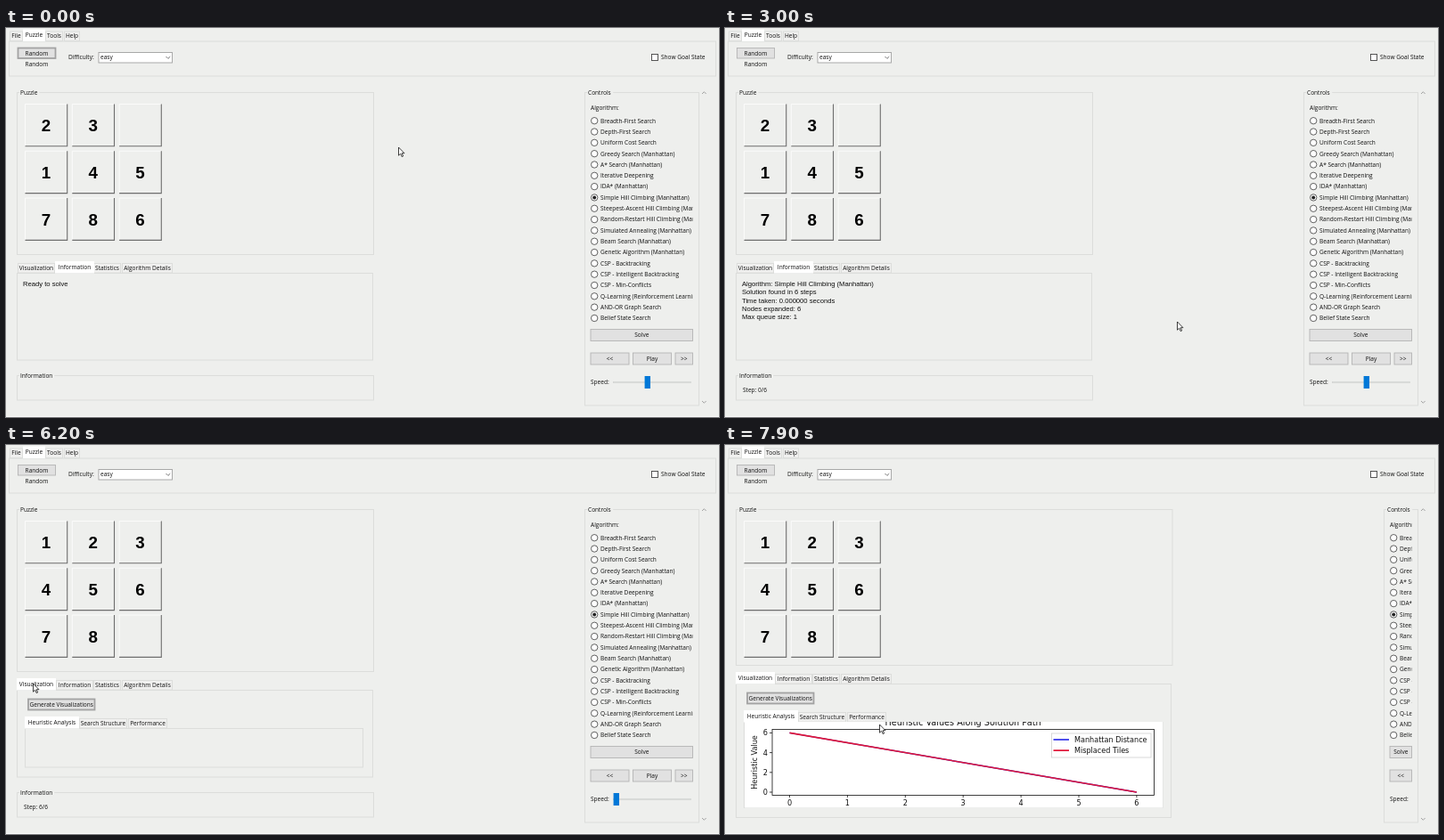
An HTML page for the animation above (8000 ms loop, 800x437 px).

```html
<!DOCTYPE html>
<html lang="en">
<head>
<meta charset="utf-8">
<title>Sliding puzzle solver</title>
<style>
  html, body { margin: 0; width: 100%; height: 100%; overflow: hidden; background: #eeefed; }
  svg { display: block; position: absolute; left: 0; top: 0; }
  text { font-family: "Open Sans", "Noto Sans", sans-serif; font-size: 6.55px; fill: #101010; white-space: pre; }
  .log { font-family: "Liberation Sans", Arial, sans-serif; font-size: 7.65px; }
  .digit { font-family: "Liberation Sans", Arial, sans-serif; font-size: 18.75px; font-weight: bold; fill: #000; }
  .plot { font-family: "DejaVu Sans", sans-serif; font-size: 8.1px; }
  .title { font-family: "DejaVu Sans", sans-serif; font-size: 9.7px; }
</style>
</head>
<body>
<svg width="800" height="437" viewBox="0 0 800 437">
  <defs>
    <clipPath id="panelClip"><rect x="640" y="80" width="130.5" height="340"/></clipPath>
    <clipPath id="plotClip"><rect x="22" y="311" width="469" height="96.5"/></clipPath>
  </defs>
  <g id="ui"></g>
  <path id="cursor" d="M0 0V9.2L2.2 7.2L3.7 10.6L5.1 10L3.7 6.7H6.5Z" fill="#fff" stroke="#111" stroke-width=".8"/>
</svg>
<script>
const LOOP = 8000, TICK = 100;
const BG = '#eeefed', LINE = '#dcdddb', BLUE = '#0078d7';

const ALGORITHMS = [
  'Breadth-First Search', 'Depth-First Search', 'Uniform Cost Search', 'Greedy Search (Manhattan)',
  'A* Search (Manhattan)', 'Iterative Deepening', 'IDA* (Manhattan)', 'Simple Hill Climbing (Manhattan)',
  'Steepest-Ascent Hill Climbing (Manhattan)', 'Random-Restart Hill Climbing (Manhattan)',
  'Simulated Annealing (Manhattan)', 'Beam Search (Manhattan)', 'Genetic Algorithm (Manhattan)',
  'CSP - Backtracking', 'CSP - Intelligent Backtracking', 'CSP - Min-Conflicts',
  'Q-Learning (Reinforcement Learning)', 'AND-OR Graph Search', 'Belief State Search'
];
const RESULT = [
  'Algorithm: Simple Hill Climbing (Manhattan)', 'Solution found in 6 steps',
  'Time taken: 0.000000 seconds', 'Nodes expanded: 6', 'Max queue size: 1'
];
const BOARDS = ['23 145786', '2 3145786', ' 23145786', '123 45786', '1234 5786', '12345 786', '12345678 '];

// Moments of the interaction, in ms
const SOLVED = 2000, REFOCUS = 3100, DRAG = [4300, 4700], PLAY = 5000, TAB = 6100, GENERATE = 6600, CHART = 7500;

// Pointer path: time, x, y
const PATH = [
  [0, 440, 134], [300, 455, 146], [1100, 672, 326], [1400, 682, 337], [1700, 700, 344], [2000, 700, 344],
  [2700, 518, 334], [3000, 507, 330], [3300, 520, 336], [4100, 720, 399], [4300, 720, 399], [4700, 685, 400],
  [4900, 724, 371], [5500, 724, 371], [6000, 33, 267], [6200, 30, 268], [6500, 62, 290], [6700, 62, 290],
  [7100, 526, 361], [7400, 526, 361], [7900, 173, 314]
];

const ease = p => p * p * (3 - 2 * p);
const between = (t, a, b) => t >= a && t < b;

function pointer(t) {
  const i = PATH.findIndex(k => k[0] > t);
  if (i < 0) return PATH[PATH.length - 1].slice(1);
  const [t0, x0, y0] = PATH[i - 1], [t1, x1, y1] = PATH[i];
  const p = ease((t - t0) / (t1 - t0));
  return [x0 + (x1 - x0) * p, y0 + (y1 - y0) * p];
}

// Text is placed by its vertical centre
const SIZES = { log: 7.65, digit: 18.75, plot: 8.1, title: 9.7 };
function text(x, y, s, cls = '', anchor = 'start') {
  const base = y + (SIZES[cls] || 6.55) * .36;
  return `<text x="${x}" y="${base}" class="${cls}" text-anchor="${anchor}">${s.replace(/</g, '&lt;')}</text>`;
}
function rect(x, y, x2, y2, fill, stroke = 'none', w = 1) {
  const o = stroke === 'none' ? 0 : .5;
  return `<rect x="${x + o}" y="${y + o}" width="${x2 - x - 2 * o}" height="${y2 - y - 2 * o}" fill="${fill}" stroke="${stroke}" stroke-width="${w}"/>`;
}
const path = (d, stroke, w = 1) => `<path d="${d}" fill="none" stroke="${stroke}" stroke-width="${w}"/>`;

function button(x, y, x2, y2, label, look = '') {
  const [fill, edge, w] = {
    focus: ['#e1e1e1', '#a2a2a2', 1.8], hover: ['#e5f1fb', BLUE, .8], down: ['#c9dff0', '#4d7c9f', 1.5]
  }[look] || ['#e1e1e1', '#b4b4b4', .9];
  return rect(x, y, x2, y2, fill, edge, w) + text((x + x2) / 2, (y + y2) / 2, label, '', 'middle');
}
function group(x, y, x2, y2, label) {
  return rect(x, y, x2, y2, 'none', LINE) +
    rect(x + 3, y - 3, x + 5 + label.length * 3.4, y + 4, BG) + text(x + 4, y + .3, label);
}
function tabs(y, x2, y2, items, selected, x = 12) {
  const one = ([a, b, label], i) => i === selected
    ? rect(a - 1, y - 7.5, b + 1, y + 6, '#fff') + text((a + b) / 2, y - 1, label, '', 'middle')
    : rect(a, y - 5.5, b, y + 6, '#f0f0ef', LINE) + text((a + b) / 2, y, label, '', 'middle');
  const drawn = items.map(one);
  const front = drawn[selected];
  drawn[selected] = '';
  return drawn.join('') + rect(x, y + 5.5, x2, y2, BG, LINE) + front;
}

function toolbar(t) {
  return tabs(9, 797, 54.5, [[4, 19, 'File'], [20, 43, 'Puzzle'], [44, 64, 'Tools'], [65, 83, 'Help']], 1, 3) +
    button(13, 22, 56, 34.5, 'Random', t < SOLVED ? 'focus' : '') + text(34.5, 41, 'Random', '', 'middle') +
    text(70, 33, 'Difficulty:') + rect(103.5, 27, 187, 39.5, '#fff', '#a0a0a0', .9) + text(106, 33, 'easy') +
    path('M179.5 32l2.4 2.4l2.4 -2.4', '#555', .8) +
    rect(724, 29, 732, 37, '#fff', '#444', .9) + text(735, 33, 'Show Goal State');
}

function tile(ch, i) {
  const x = 21.5 + i % 3 * 52.8, y = 85.5 + Math.floor(i / 3) * 52.8;
  return path(`M${x} ${y + 47}V${y}H${x + 47}`, '#fbfbfa') +
    path(`M${x} ${y + 47.3}H${x + 47.2}V${y}`, '#6e6e6e', 1.1) +
    (ch === ' ' ? '' : text(x + 23.4, y + 24.1, ch, 'digit', 'middle'));
}

function chart() {
  const px = v => 72.5 + v * 64.9, py = v => 390 - v * 11.1;
  let s = rect(22, 311, 491, 407.5, '#fff') + '<g clip-path="url(#plotClip)">' +
    text(267, 311.8, 'Heuristic Values Along Solution Path', 'title', 'middle');
  for (let v = 0; v <= 6; v++) {
    s += path(`M${px(v)} 393v3`, '#111', .8) + text(px(v), 402.3, String(v), 'plot', 'middle');
    if (v % 2 === 0) s += path(`M53 ${py(v)}h-3`, '#111', .8) + text(48, py(v), String(v), 'plot', 'end');
  }
  s += `<g transform="translate(33 356.5) rotate(-90)">${text(0, 0, 'Heuristic Value', 'plot', 'middle')}</g>`;
  const slope = `M${px(0)} ${py(6)}L${px(6)} ${py(0)}`;
  s += path(slope, '#2020e0', 1.4) + path(slope, '#e0183a', 1.6) + rect(52.5, 319, 482, 394, 'none', '#111', .8);
  s += rect(366, 323.5, 478.5, 351.5, '#fff', '#d4d4d4', .9);
  [['#1414e6', 'Manhattan Distance'], ['#e0183a', 'Misplaced Tiles']].forEach(([c, label], i) => {
    const y = 331 + i * 12.2;
    s += path(`M368.5 ${y}H386`, c, 1.7) + text(392, y, label, 'plot');
  });
  return s + '</g>';
}

function notebook(t) {
  const wide = t >= CHART, up = wide ? 7 : 0, visual = t >= TAB;
  let s = tabs(269.5 - up, wide ? 501 : 412, wide ? 419 : 373.5,
    [[13, 55, 'Visualization'], [56, 98, 'Information'], [98, 129, 'Statistics'], [130, 187, 'Algorithm Details']],
    visual ? 0 : 1);
  if (!visual) {
    const lines = t < SOLVED ? ['Ready to solve'] : RESULT;
    return s + lines.map((line, i) => text(19, 287.3 + i * 9.3, line, 'log')).join('');
  }
  s += button(24.5, 285 - up, 100, 298 - up, 'Generate Visualizations', between(t, GENERATE, CHART) ? 'down' : 'focus');
  s += tabs(312.5 - up, wide ? 491.5 : 401, wide ? 408 : 362.5,
    [[22, 81, 'Heuristic Analysis'], [82, 136, 'Search Structure'], [137, 181, 'Performance']], 0, 21);
  return s + (wide ? chart() : '');
}

function controls(t) {
  const wide = t >= CHART, dx = wide ? 90 : 0, x = 656 + dx;
  let s = group(649 + dx, 72, 778, 424.5, 'Controls') +
    path('M781 74l2.3 -2.3l2.3 2.3M781 419l2.3 2.3l2.3 -2.3', '#999', .9) +
    '<g clip-path="url(#panelClip)">' + text(x, 89.5, 'Algorithm:');
  ALGORITHMS.forEach((name, i) => {
    const y = 104.2 + i * 12.32;
    s += `<circle cx="${x + 4.2}" cy="${y}" r="3.7" fill="#fff" stroke="#3c3c3c" stroke-width=".8"/>` +
      (i === 7 ? `<circle cx="${x + 4.2}" cy="${y}" r="2" fill="#222"/>` : '') + text(x + 11, y, name);
  });
  s += text(x, 398, 'Speed:') + '</g>';

  const solve = between(t, 1600, SOLVED) ? 'hover' : between(t, REFOCUS, PLAY) ? 'focus' : '';
  s += button(x - .5, 338, 771, 352, 'Solve', solve);
  if (wide) return s + button(x - .5, 364.5, 771, 378.5, '<<');

  const play = between(t, 4900, 5600) ? 'hover' : between(t, 5600, TAB) ? 'focus' : '';
  s += button(655.5, 364.5, 699.5, 378.5, '<<') + button(703, 364.5, 747, 378.5, 'Play', play) +
    button(750.5, 364.5, 771, 378.5, '>>');
  const drag = Math.min(1, Math.max(0, (t - DRAG[0]) / (DRAG[1] - DRAG[0])));
  const thumb = 719.8 - 35 * ease(drag);
  return s + rect(681, 396.8, 769, 399.2, '#e4e5e4', '#d2d3d2', .7) +
    rect(thumb - 3.2, 391, thumb + 3.2, 405, between(t, 4100, 4800) ? '#171717' : BLUE);
}

function scene(t) {
  const wide = t >= CHART;
  const step = Math.min(6, Math.max(0, Math.floor((t - PLAY) / TICK) + 1));
  let s = rect(0, 0, 800, 437, BG) + rect(0, 436, 800, 437, '#fbfbfb') + toolbar(t) +
    group(12, 72, wide ? 502.5 : 413, wide ? 248 : 255, 'Puzzle') +
    [...BOARDS[step]].map(tile).join('') + notebook(t);
  if (!wide) {
    s += group(12, 390, 413, 418.5, 'Information');
    if (t >= SOLVED) s += text(20, 407, `Step: ${step}/6`);
  }
  return s + controls(t);
}

const ui = document.getElementById('ui'), cursor = document.getElementById('cursor');
const start = performance.now();
let shown = -1;

function frame() {
  const t = Math.floor((performance.now() - start) % LOOP / TICK) * TICK;
  if (t !== shown) {
    shown = t;
    ui.innerHTML = scene(t);
    const [x, y] = pointer(t);
    cursor.setAttribute('transform', `translate(${x + .5} ${y})`);
  }
  requestAnimationFrame(frame);
}
frame();
</script>
</body>
</html>
```
